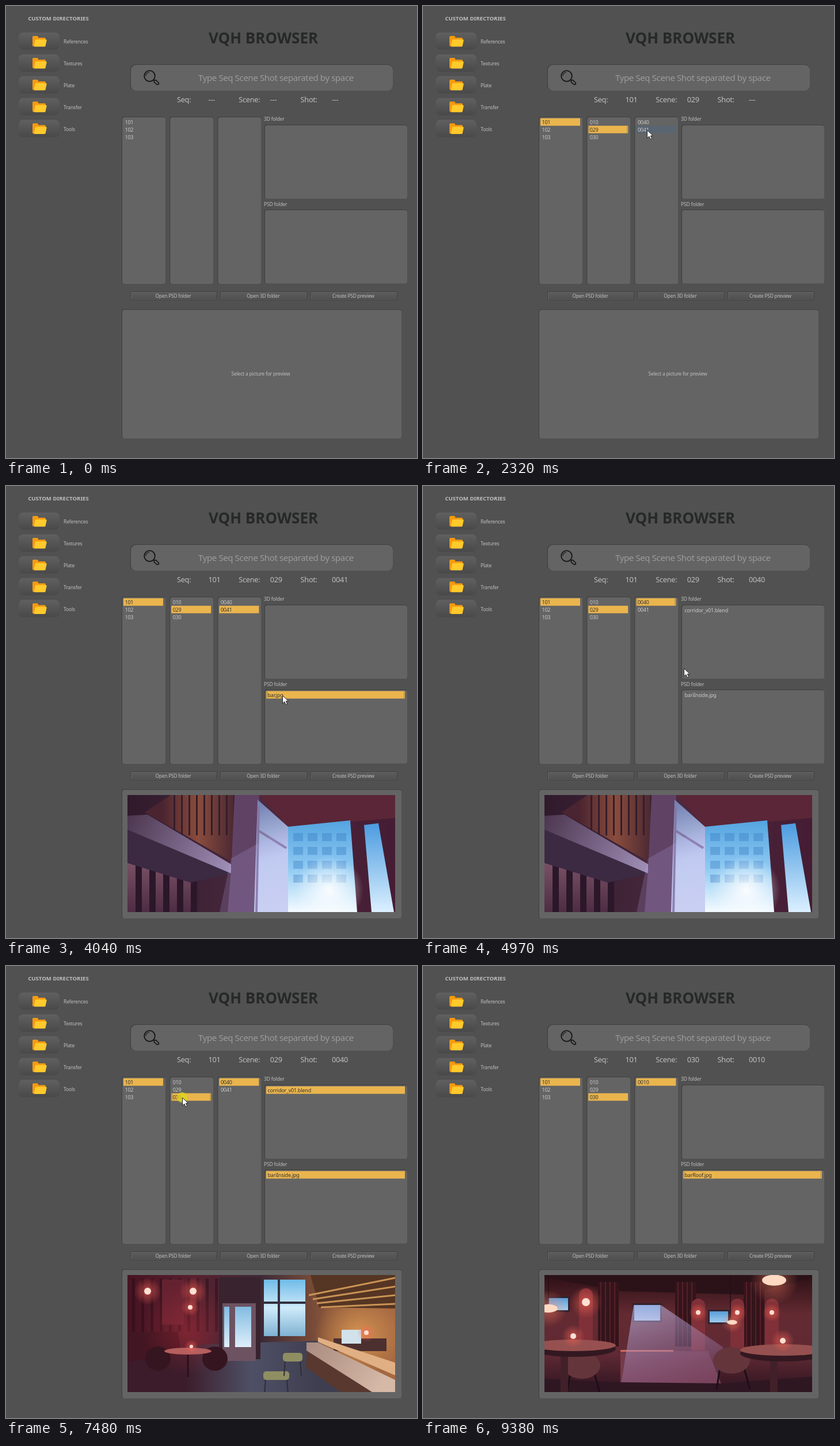
An HTML page with a canvas that plays this animation: 714x784 px, repeating every 9.86 s.

```html
<!DOCTYPE html>
<html lang="en">
<head>
<meta charset="utf-8">
<title>Shot browser</title>
<style>
  html, body { margin: 0; width: 714px; height: 784px; overflow: hidden; background: #515151; }
  canvas { display: block; }
</style>
</head>
<body>
<canvas id="stage" width="714" height="784"></canvas>
<script>
const ctx = document.getElementById('stage').getContext('2d', { alpha: false });
const LOOP = 9860, STEP = LOOP / 63;
const GREY = '#bebebe', NONE = '---';

// Sequence > scene > shot > [3D files, PSD files]
const tree = {
  101: {
    '010': {},
    '029': { '0040': [['corridor_v01.blend'], ['bariInside.jpg']], '0041': [[], ['bar.jpg']] },
    '030': { '0010': [[], ['barRoof.jpg']] }
  },
  102: {},
  103: {}
};
const views = { 'bar.jpg': drawWindow, 'bariInside.jpg': drawBar, 'barRoof.jpg': drawRoof };

// Each click: the step it happens on, list, row, and steps until the result shows
const clicks = [
  { at: 7, list: 0, row: 0 },
  { at: 11, list: 1, row: 1 },
  { at: 16, list: 2, row: 1 },
  { at: 23, list: 4, row: 0, wait: 2 },
  { at: 30, list: 2, row: 0 },
  { at: 35, list: 4, row: 0 },
  { at: 41, list: 3, row: 0 },
  { at: 48, list: 1, row: 2 },
  { at: 52, list: 2, row: 0 },
  { at: 56, list: 4, row: 0 }
];
const ENTER = 2, LEAVE = 59;
const stops = [
  { at: ENTER, x: 76, y: 134 },
  ...clicks.map(({ at, list, row }) => {
    const { x, y } = rowBox(list, row);
    return { at, x: x + (list < 3 ? 19 : 28), y: y + 7 };
  }),
  { at: LEAVE + 2, x: 508, y: 748 }
];

function listBox(n) {
  return n < 3 ? { x: 201 + 83.2 * n, y: 192, w: 76, h: 290 }
               : { x: 449, y: 206 + 147 * (n - 3), w: 248, h: 128.5 };
}
function rowBox(n, i) {
  const { x, y, w } = listBox(n);
  return { x: x + 3, y: y + 2.7 + 13 * i, w: w - 7, h: 13 };
}
function inside(p, { x, y, w, h }) {
  return p && p.x >= x && p.x < x + w && p.y >= y && p.y < y + h;
}

function stateAt(step) {
  const s = {
    rows: [Object.keys(tree), [], [], [], []], selected: Array(5).fill(-1),
    info: Array(3).fill(NONE), focus: -1, view: null, clicking: false
  };
  for (const { at, list, row, wait = 1 } of clicks) {
    if (step < at) break;
    s.selected[list] = row;
    s.focus = list;
    s.clicking = step === at;
    if (step < at + wait) break;
    const label = s.rows[list][row];
    if (list > 2) {
      s.view = views[label] ?? s.view;
      continue;
    }
    s.info.fill(NONE, list);
    s.info[list] = label;
    s.selected.fill(-1, list + 1);
    s.rows.fill([], list + 1);
    const node = s.info.slice(0, list + 1).reduce((n, key) => n[key], tree);
    if (list === 2) s.rows.splice(3, 2, ...node);
    else s.rows[list + 1] = Object.keys(node);
  }
  return s;
}

// The pointer rests after a click, then glides to the next stop shortly before it is due.
function pointerAt(step) {
  if (step < ENTER || step > LEAVE) return null;
  const i = stops.findLastIndex(s => s.at <= step);
  const from = stops[i], to = stops[i + 1];
  const start = Math.max(from.at + 1, to.at - 4);
  const k = Math.sin(Math.min(1, Math.max(0, (step - start) / 2)) * Math.PI / 2);
  return { x: Math.round(from.x + (to.x - from.x) * k), y: Math.round(from.y + (to.y - from.y) * k) };
}

function text(str, x, y, size, color = GREY, align = 'left', weight = 400) {
  ctx.font = `${weight} ${size}px "Noto Sans", sans-serif`;
  ctx.letterSpacing = weight > 400 ? '0px' : `${-0.025 * size}px`;
  ctx.textAlign = align;
  ctx.fillStyle = color;
  ctx.fillText(str, x, y + size * 0.36);
}
function rect(color, x, y, w, h) {
  ctx.fillStyle = color;
  ctx.fillRect(x, y, w, h);
}
function round(color, x, y, w, h, r) {
  ctx.fillStyle = color;
  ctx.beginPath();
  ctx.roundRect(x, y, w, h, r);
  ctx.fill();
}
function poly(color, points) {
  ctx.fillStyle = color;
  ctx.fill(new Path2D(`M${points}Z`));
}
function line(color, width, d) {
  ctx.strokeStyle = color;
  ctx.lineWidth = width;
  ctx.stroke(new Path2D(d));
}
function oval(color, x, y, rx, ry = rx) {
  ctx.fillStyle = color;
  ctx.beginPath();
  ctx.ellipse(x, y, rx, ry, 0, 0, 7);
  ctx.fill();
}
function fade(x0, y0, x1, y1, ...colors) {
  const g = ctx.createLinearGradient(x0, y0, x1, y1);
  colors.forEach((c, i) => g.addColorStop(i / (colors.length - 1), c));
  return g;
}
function glow(x, y, r, rgb, alpha) {
  const g = ctx.createRadialGradient(x, y, 0, x, y, r);
  g.addColorStop(0, `rgba(${rgb},${alpha})`);
  g.addColorStop(1, `rgba(${rgb},0)`);
  oval(g, x, y, r);
}
function lamp(x, y, r = 5) {
  glow(x, y, r * 4, '255,100,85', 0.6);
  oval('#ffe0d4', x, y, r);
}
function slats(color, from, to, gap, width, top, height) {
  for (let x = from; x < to; x += gap) rect(color, x, top, width, height);
}
function panel(x, y, w, h, r = 4) {
  round('#3f3f3f', x, y, w, h, r);
  round('#646464', x + 1, y + 1, w - 1, h - 1, r);
}

// The three previews, 465 by 203, in a few flat tones
function drawWindow() {
  rect(fade(0, 0, 465, 0, '#2f1a2b', '#4c2a40', '#451c33'), 0, 0, 465, 203);
  poly(fade(60, 0, 186, 0, '#4a2430', '#8a4c3c', '#4a2833'), '75,0 186,0 180,115 30,30');
  slats('#351d2a', 80, 186, 13, 3, 0, 70);
  poly(fade(0, 110, 0, 203, '#7d5468', '#4d2c43'), '0,114 115,152 109,203 0,203');
  slats('#2b1729', 14, 115, 24, 11, 110, 93);
  poly('#3b2a42', '0,40 180,136 110,152 0,118');
  poly(fade(0, 40, 180, 130, '#4d3750', '#a08fb8'), '0,36 35,34 180,120 180,136 0,60');
  poly('#604264', '186,0 229,0 221,203 174,203 180,130');
  poly('#5a2638', '229,0 465,0 465,40 279,55');
  poly(fade(220, 20, 270, 203, '#7783b4', '#c3d2f2', '#cfd9f3'), '226,8 279,55 279,203 220,203');
  line('#8577a6', 4, 'M228,20L224,203M228,62L276,92');
  poly(fade(0, 45, 0, 203, '#55a4e0', '#8cc8f2', '#f4fbff'), '279,55 387,44 399,203 279,203');
  for (let i = 0; i < 16; i++) rect('rgba(50,118,190,.35)', 288 + i % 4 * 25, 66 + (i >> 2) * 24, 17, 14);
  glow(350, 165, 60, '255,255,255', 0.9);
  poly(fade(0, 49, 0, 203, '#4a9be0', '#dcf0ff'), '411,52 436,49 463,203 424,203');
  poly('rgba(180,170,235,.2)', '279,55 279,203 160,203 180,110');
}

function drawBar() {
  rect(fade(0, 0, 465, 0, '#471322', '#58202f', '#3c2936', '#8a5539', '#a86a42'), 0, 0, 465, 203);
  poly(fade(100, 0, 330, 0, '#3c1c2a', '#4e5066', '#3f3e50'), '0,203 0,150 130,120 330,114 410,203');
  slats('rgba(35,12,22,.45)', 8, 160, 16, 5, 6, 92);
  rect('#642231', 60, 8, 38, 78);
  poly('#421622', '0,98 87,98 95,138 0,150');
  glow(105, 95, 80, '200,50,60', 0.35);
  for (const x of [35, 114]) lamp(x, 28, 6);
  lamp(109, 56, 4);
  rect('#38232f', 159, 4, 72, 142);
  rect('#6d5362', 165, 49, 58, 100);
  for (const x of [168, 187]) rect(fade(0, 55, 0, 126, '#82bbe2', '#e0f0fb'), x, 55, x - 159, 70);
  rect(fade(0, 8, 0, 106, '#6fbbe8', '#cfeafa', '#7fb2d2'), 237, 8, 72, 98);
  line('#34303f', 4, 'M237,48h72M263,8v98');
  glow(400, 105, 75, '255,185,95', 0.6);
  poly('#553523', '318,0 465,0 465,58 333,56');
  for (let i = 0; i < 4; i++) line('#c99355', 3, `M${315 + i * 7},${35 + i * 7}L465,${5 + i * 15}`);
  rect('#4c3030', 358, 110, 92, 22);
  rect('#d2e2ea', 372, 95, 34, 24);
  lamp(415, 100, 4);
  poly('#58382f', '312,125 430,203 370,203 310,160');
  poly(fade(311, 117, 430, 203, '#a98b80', '#d5b8a6'), '311,117 331,117 465,182 465,203 425,203 311,131');
  poly('#e0b084', '331,108 465,152 465,174 331,116');
  for (const x of [53, 152]) oval('#35151f', x, 145, 22, 21);
  line('#28121d', 3, 'M105,133v44');
  oval('#b65f5e', 105, 132, 41, 6);
  lamp(111, 124, 3);
  for (const [x, y, w] of [[236, 167, 45], [270, 135, 34]]) {
    line('#2f2d37', 2, `M${x + 5},${y}l-3,40M${x + w - 5},${y}l3,40`);
    round('#8f8e63', x, y, w, 15, 5);
  }
}

function drawRoof() {
  rect(fade(0, 0, 0, 203, '#2c1016', '#632a31', '#602a34', '#2e1420'), 0, 0, 465, 203);
  poly('#2a1218', '0,0 465,0 465,5 349,34 134,28 0,4');
  for (const x of [93, 227, 346]) {
    rect('#34141b', x, 12, 36, 112);
    slats('#55202a', x + 4, x + 36, 8, 2, 12, 112);
  }
  for (const [x, y, w] of [[6, 40, 35], [156, 52, 45], [287, 63, 32]]) {
    rect('#32212e', x - 3, y - 3, w + 6, w * 0.6 + 6);
    rect(fade(0, y, 0, y + 26, '#5a9dd8', '#b6dcf6'), x, y, w, w * 0.6);
  }
  for (const x of [72, 267, 335, 395]) {
    const y = x < 100 ? 47 : 65;
    round('#803038', x - 12, y - 24, 24, 90, [12, 12, 0, 0]);
    lamp(x, y, x < 100 ? 7 : 4);
  }
  poly('#743a4a', '132,132 284,132 307,188 132,188');
  rect('#d06a60', 132, 130, 92, 3);
  poly(fade(180, 52, 230, 203, 'rgba(190,185,230,.6)', 'rgba(140,95,150,.25)'), '155,52 202,52 310,125 300,203 131,203');
  poly('#2f1722', '0,180 132,186 310,188 465,176 465,203 0,203');
  line('#260f19', 1.5, 'M7,0v50M323,0v75');
  for (const [x, y, r] of [[7, 58, 16], [326, 82, 9], [399, 9, 21]]) {
    glow(x, y, r * 2, '255,130,100', 0.5);
    oval('#ffd9c2', x, y, r, r * 0.45);
  }
  for (const [x, y] of [[65, 157], [325, 148]]) {
    line('#1d0e18', 3, `M${x - 18},${y}l-8,50M${x + 18},${y}l14,50`);
    oval('#65353c', x, y, 32, 23);
  }
  for (const [x, y] of [[50, 122], [414, 130]]) {
    rect('#42202a', x - 22, y, 13, 82);
    oval('#331821', x, y + 6, 74, 14);
    oval('#96504f', x, y, 74, 10);
    lamp(x, y - 16);
  }
}

function drawFolderButton(label, i, mouse) {
  const box = { x: 22, y: 46 + i * 37.9, w: 71, h: 30 };
  const [top, bottom] = inside(mouse, box) ? ['#6a6a6a', '#555'] : ['#606060', '#494949'];
  round(fade(0, box.y, 0, box.y + 30, top, bottom), box.x, box.y, box.w, box.h, 8);
  ctx.save();
  ctx.translate(46, box.y + 6);
  round('#f79a10', 0, 3, 23, 15, 2);
  round('#f79a10', 0, 0, 10, 8, 2);
  poly('#ffca2c', '6,6H23Q25,6 24.6,8L22.6,17Q22,18.5 20.5,18.5H4Q2.5,18.5 2.8,17L4.5,8Q5,6 6,6');
  ctx.restore();
  text(label, 100, box.y + 16, 8.6);
}

function drawSearch() {
  panel(216, 101, 456, 46, 9);
  line('#141414', 1.8, 'M240.2,121.5a9.3,9.3 0 1 1 18.6,0a9.3,9.3 0 1 1 -18.6,0');
  line('#141414', 1.2, 'M243,121a7,7 0 0 1 6,-6');
  ctx.save();
  ctx.translate(256.5, 128);
  ctx.rotate(0.75);
  line('#141414', 1.6, 'M0,0h2M4,-2.2h5a2.2,2.2 0 0 1 0,4.4h-5a2.2,2.2 0 0 1 0,-4.4');
  ctx.restore();
  text('Type Seq Scene Shot separated by space', 334, 125, 15, '#9b9b9b');
}

function drawButton(label, i) {
  const x = 216 + i * 156.4, w = 151;
  rect('#404040', x, 495, w, 15.5);
  rect('#666', x + 1, 496, w - 2, 13.5);
  rect(fade(0, 497, 0, 509, '#5b5b5b', '#515151'), x + 2, 497, w - 3, 12);
  text(label, x + w / 2 - 1, 503, 8.4, GREY, 'center');
}

function drawList(state, n, mouse) {
  const { x, y, w, h } = listBox(n);
  panel(x, y, w, h);
  state.rows[n].forEach((label, i) => {
    const box = rowBox(n, i), selected = state.selected[n] === i;
    if (selected || inside(mouse, box)) rect(selected ? '#eab54e' : '#596571', box.x, box.y, box.w, box.h);
    if (selected && state.focus === n) line('#a98945', 1, `M${box.x + 1.5},${box.y}v13M${box.x + box.w - 1.5},${box.y}v13`);
    text(label, x + 5.5, box.y + 6.8, 9, selected ? '#333' : '#cacaca');
  });
}

function drawPreview(view) {
  panel(201, 526, 486, 224);
  if (!view) return text('Select a picture for preview', 442.5, 638, 8.5, GREY, 'center');
  ctx.save();
  ctx.translate(211, 536);
  ctx.beginPath();
  ctx.rect(0, 0, 465, 203);
  ctx.clip();
  view();
  ctx.restore();
}

function drawPointer({ x, y }, clicking) {
  if (clicking) oval('rgba(220,218,25,.75)', x, y, 9);
  const arrow = '.5,.5V14L3.8,11 6.2,16.2 8.6,15.2 6.3,10.1H10.6';
  ctx.save();
  ctx.translate(x, y);
  poly('#fff', arrow);
  line('#222', 1, `M${arrow}Z`);
  ctx.restore();
}

function draw(time) {
  const step = Math.floor((time + 40) / STEP);
  const state = stateAt(step), mouse = pointerAt(step);

  rect('#515151', 0, 0, 714, 784);
  text('CUSTOM DIRECTORIES', 91, 22, 9.6, GREY, 'center', 700);
  ['References', 'Textures', 'Plate', 'Transfer', 'Tools'].forEach((label, i) => drawFolderButton(label, i, mouse));
  text('VQH BROWSER', 447, 55.5, 26, '#262827', 'center', 700);
  drawSearch();
  ['Seq:', 'Scene:', 'Shot:'].forEach((label, i) => {
    const x = 297 + 107.3 * i;
    text(label, x, 162, 12.8);
    text(state.info[i], x + 54.4, 162, 12.8);
  });
  text('3D folder', 448, 196, 8.6);
  text('PSD folder', 448, 343.5, 8.6);
  state.rows.forEach((_, n) => drawList(state, n, mouse));
  ['Open PSD folder', 'Open 3D folder', 'Create PSD preview'].forEach(drawButton);
  drawPreview(state.view);
  if (mouse) drawPointer(mouse, state.clicking);
}

function tick() {
  draw(performance.now() % LOOP);
  requestAnimationFrame(tick);
}
tick();
</script>
</body>
</html>
```
